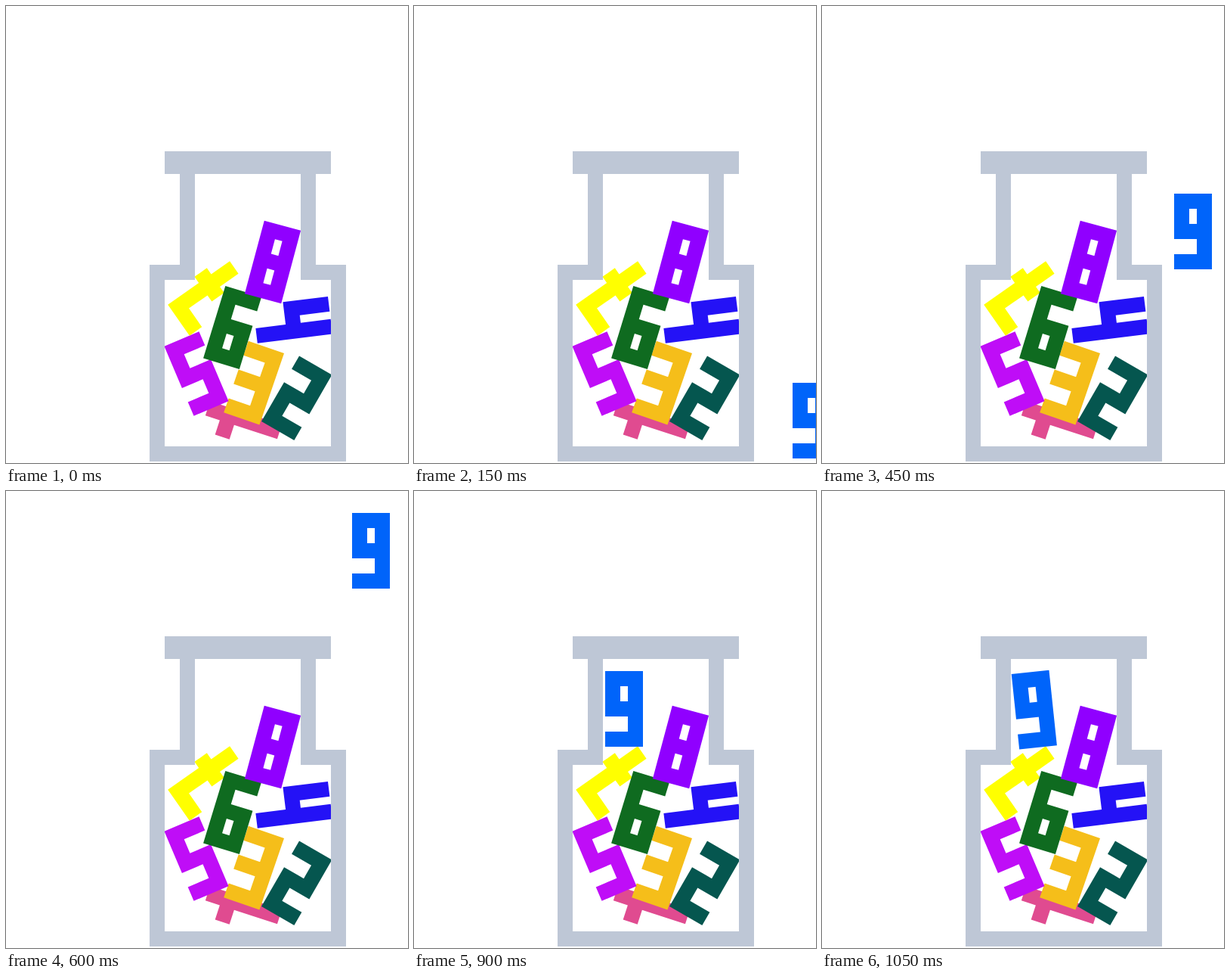
An HTML page for the animation above (1200 ms loop, 532x604 px).

```html
<!DOCTYPE html>
<html lang="en">
<head>
<meta charset="utf-8">
<title>Number jar</title>
<style>
  html, body { margin: 0; width: 100%; height: 100%; overflow: hidden; background: #fff; }
  svg { display: block; width: 532px; height: 604px; overflow: hidden; }
  path { fill-rule: evenodd; }
</style>
</head>
<body>
<svg id="stage" viewBox="0 0 532 604"></svg>
<script>
const stage = document.getElementById('stage');

// Each digit is a 50 x 100 block shape centred on the origin.
const digits = [
  { color: '#e04b90', at: [311.4, 556.8, 18],  d: 'M-50-20H50V0H-10V20H-30V0H-50Z' },
  { color: '#05564f', at: [384.7, 518.3, 30],  d: 'M-25-50H25V10H-5V30H25V50H-25V-10H5V-30H-25Z' },
  { color: '#f5be1a', at: [328.1, 498.2, 19],  d: 'M-25-50H25V50H-25V30H5V10H-25V-10H5V-30H-25Z' },
  { color: '#2412f6', at: [379.4, 414.9, 83],  d: 'M-25-50H-5V-10H5V-50H25V50H5V10H-25Z' },
  { color: '#bf0df7', at: [252, 486, -23],     d: 'M-25-50H25V-30H-5V-10H25V50H-25V30H5V10H-25Z' },
  { color: '#ffff00', at: [269.5, 386.5, -125], d: 'M-25-50H25V0H35V20H25V50H5V20H-5V0H5V-30H-25Z' },
  { color: '#0f6b20', at: [299.6, 425, 17],    d: 'M-25-50H25V-30H-5V-10H25V50H-25ZM-5 10V30H5V10Z' },
  { color: '#9000ff', at: [353, 338.5, 15],    d: 'M-25-50H25V50H-25ZM-5-30V-10H5V-30ZM-5 10V30H5V10Z' },
  { color: '#0064fa', at: [600, 548, 0],       d: 'M-25-50H25V50H-25V30H5V10H-25ZM-5-30V-10H5V-30Z' }
];

// Centre x, centre y and angle of the moving nine, one row per step.
const hops = [
  [600, 548, 0],
  [526, 548, 0],
  [497, 534, 0],
  [491, 298, 0],
  [483, 79, 0],
  [280, 131, 0],
  [278, 288, 0],
  [280.8, 289.2, -6]
];

const jar = 'M210 192H430V222H410V342H450V602H190V342H230V222H210Z' +
            'M250 222V362H210V582H430V362H390V222Z';

function addPath(d, color) {
  const path = document.createElementNS('http://www.w3.org/2000/svg', 'path');
  path.setAttribute('d', d);
  path.setAttribute('fill', color);
  return stage.appendChild(path);
}

const pose = ([x, y, angle]) => `translate(${x}px, ${y}px) rotate(${angle}deg)`;

const shapes = digits.map(({ d, color, at }) => {
  const path = addPath(d, color);
  path.style.transform = pose(at);
  return path;
});
addPath(jar, '#bec7d6');

const nine = shapes[8];
const keyframes = [...hops, hops[7]].map((hop, i) => ({
  transform: pose(hop),
  offset: i / hops.length,
  easing: 'steps(1, end)'
}));
nine.animate(keyframes, { duration: 1200, iterations: Infinity });
</script>
</body>
</html>
```
